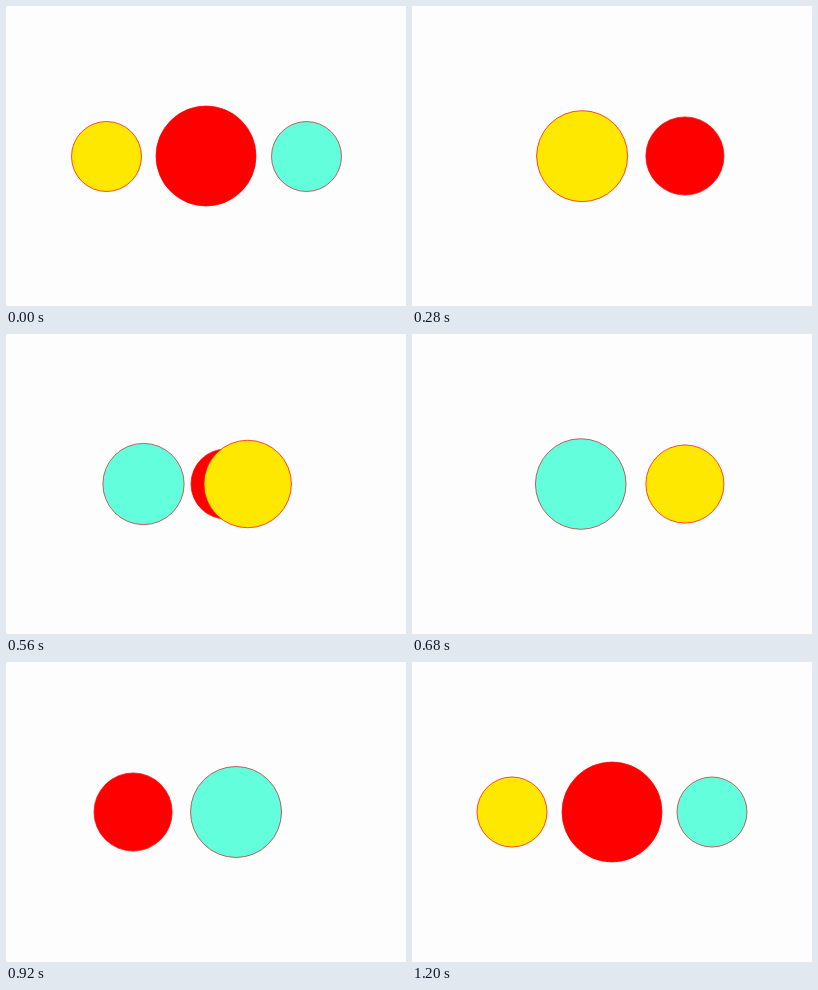
Write an HTML page that moves like this. It is 400 px wide and 300 px high and loops after 1.24 s.

```html
<!DOCTYPE html>
<html lang="en">
<head>
<meta charset="utf-8">
<title>Three circling discs</title>
<style>
  html, body { margin: 0; width: 100%; height: 100%; overflow: hidden; background: #fdfdfd; }
  svg { display: block; width: 100vw; height: 100vh; }
  circle { stroke-width: .7; }
</style>
</head>
<body>
<svg viewBox="0 0 400 300">
  <g id="stage"></g>
</svg>
<script>
const LOOP = 1240, STEP = 40, TICK = 16;
const LEFT = [100, 150, 35], MID = [200, 150, 50], RIGHT = [300, 150, 35];

// Keys: [tick, [x, y, radius]]; each disc drops behind the others on its way back.
const discs = [
  { fill: '#ffe800', stroke: '#f00', back: 50, keys: [
    [0, [100.5, 150.5, 35]], [25, MID], [49, RIGHT], [50, RIGHT], [75, LEFT]] },
  { fill: '#f00', stroke: '#f00', back: 25, keys: [
    [0, MID], [24, RIGHT], [25, RIGHT], [50, LEFT], [51, LEFT], [75, MID]] },
  { fill: '#63ffdd', stroke: '#b22', back: 0, keys: [
    [0, [300.5, 150.5, 35]], [25, LEFT], [26, LEFT], [50, MID], [75, RIGHT]] }
];

const stage = document.getElementById('stage');
for (const d of discs) {
  d.el = document.createElementNS('http://www.w3.org/2000/svg', 'circle');
  d.el.setAttribute('fill', d.fill);
  d.el.setAttribute('stroke', d.stroke);
  stage.append(d.el);
}

function poseAt(keys, tick) {
  let i = 0;
  while (i < keys.length - 2 && tick >= keys[i + 1][0]) i++;
  const [t0, a] = keys[i], [t1, b] = keys[i + 1];
  const k = Math.min(1, (tick - t0) / (t1 - t0));
  return a.map((v, n) => v + (b[n] - v) * k);
}

let rear = null;

function render(ms) {
  const tick = Math.floor((ms % LOOP) / STEP) * STEP / TICK;
  for (const d of discs) {
    const pose = poseAt(d.keys, tick);
    ['cx', 'cy', 'r'].forEach((name, n) => d.el.setAttribute(name, pose[n].toFixed(3)));
  }
  const last = discs.find(d => tick >= d.back && tick < d.back + 25) || discs[0];
  if (last !== rear) {
    rear = last;
    stage.prepend(rear.el);
  }
}

const start = performance.now();
function loop() {
  render(performance.now() - start);
  requestAnimationFrame(loop);
}
loop();
</script>
</body>
</html>
```
